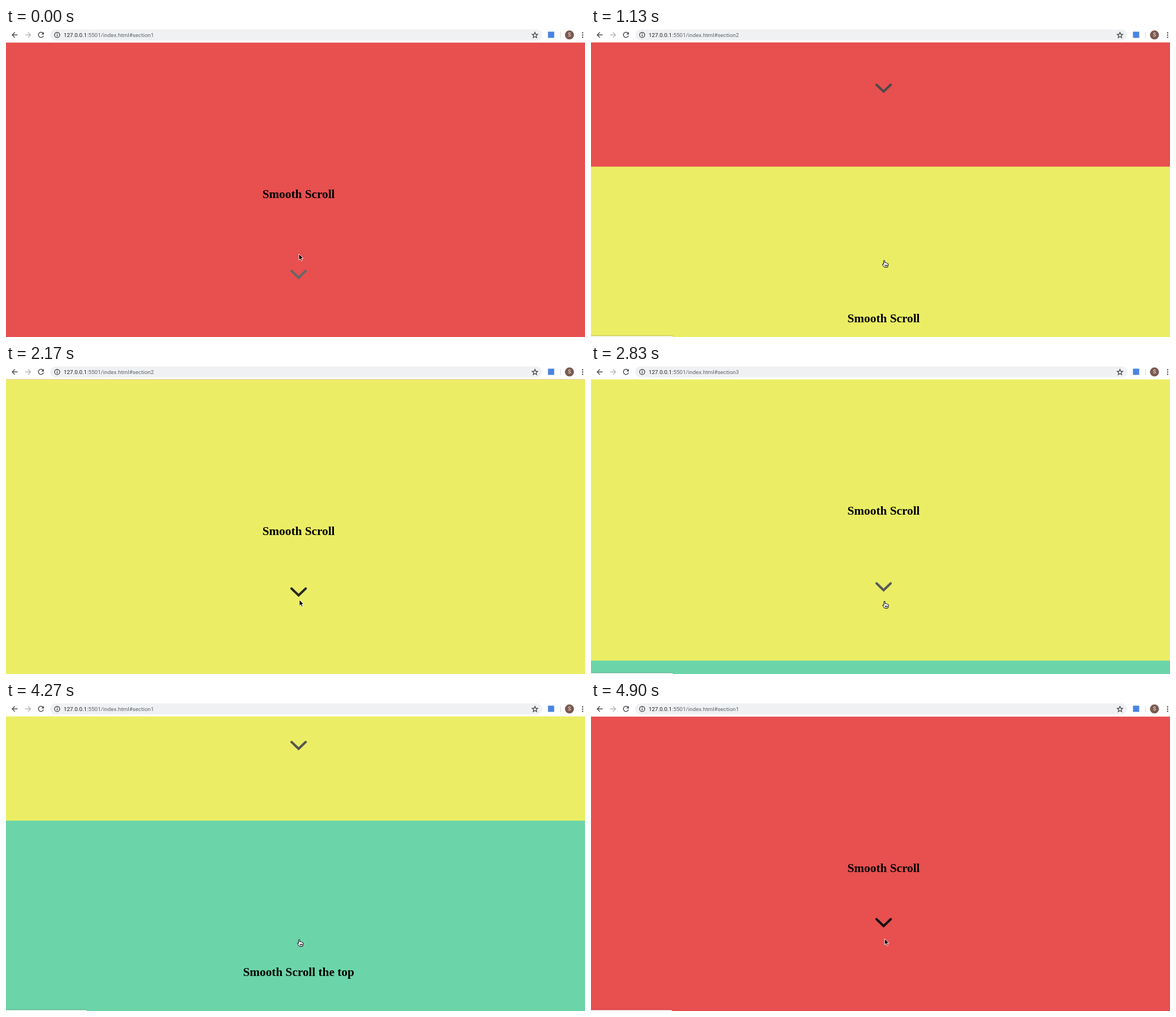
An HTML page that plays this animation: 1024 px wide and 547 px high, repeating every 4930 ms.

```html
<!DOCTYPE html>
<html lang="en">
<head>
<meta charset="utf-8">
<title>Smooth Scroll</title>
<style>
  html, body { margin: 0; width: 100%; height: 100%; overflow: hidden; background: #fff; }
  svg { display: block; width: 1024px; height: 547px; }
  .heading { font: bold 21.3px "Liberation Serif", Times, serif; text-anchor: middle; }
  .url { font: 9.9px Roboto, Arial, sans-serif; fill: #5f6368; }
  .url .host { fill: #202124; }
  .icon { fill: none; stroke: #4a4d51; stroke-width: 1.4; }
  .chevron { fill: none; stroke-width: 4.2; stroke-linecap: round; }
</style>
</head>
<body>
<svg viewBox="0 0 1024 547">
  <defs>
    <filter id="shadow" x="-10%" y="-300%" width="120%" height="700%">
      <feDropShadow dx="0" dy="0" stdDeviation="0.9" flood-opacity=".6"/>
    </filter>
  </defs>

  <g id="page"></g>

  <rect id="status" x="-6" y="545.5" width="152" height="8" rx="2.5" fill="#fff" filter="url(#shadow)"/>

  <g id="toolbar">
    <rect width="1024" height="25.5" fill="#fff"/>
    <rect x="78" y="2.5" width="870" height="19.5" rx="9.75" fill="#eff1f3"/>
    <path class="icon" d="M20.500 12.300H11M15.600 7.600L11 12.300L15.600 17"/>
    <path class="icon" style="stroke:#b4b6b9" d="M34 12.300H43.500M38.900 7.600L43.500 12.300L38.900 17"/>
    <path class="icon" d="M65.600 9.300A4.600 4.600 0 1 0 66.300 13.600"/>
    <path fill="#4a4d51" d="M67 7V11.500H62.500Z"/>
    <circle class="icon" cx="90.500" cy="12.300" r="4.600" stroke-width="1.100"/>
    <path class="icon" stroke-width="1.200" d="M90.500 11.500V15M90.500 9.300V10.500"/>
    <text class="url" x="102" y="16"><tspan class="host">127.0.0.1</tspan>:5501/index.html#section<tspan id="anchor">1</tspan></text>
    <path class="icon" stroke-width="1.100" d="M935.500 7.800L936.900 11L940.300 11.300L937.700 13.600L938.500 17L935.500 15.200L932.500 17L933.300 13.600L930.700 11.300L934.100 11Z"/>
    <rect x="958.500" y="6.500" width="11" height="11" fill="#4a83e2"/>
    <path d="M980.500 7V18" stroke="#d5d7da"/>
    <circle cx="996.500" cy="12.300" r="8" fill="#7b5a50"/>
    <text x="996.500" y="15.300" fill="#fff" text-anchor="middle" font-family="Roboto, sans-serif" font-size="8.500">S</text>
    <g fill="#4a4d51">
      <circle cx="1019.800" cy="8.500" r="1.200"/><circle cx="1019.800" cy="12.500" r="1.200"/><circle cx="1019.800" cy="16.500" r="1.200"/>
    </g>
  </g>

  <g id="cursor" stroke-linejoin="round">
    <path id="arrow" fill="#000" stroke="#fff" stroke-width=".9" d="M0 0V10.800L2.500 8.500L4.200 12.400L6 11.600L4.400 7.800H7.800Z"/>
    <path id="hand" fill="#fff" stroke="#000" stroke-width="1"
      d="M-1 .8Q0 -.6 1 .8V4.600Q2.300 3.600 3.200 5Q4.400 4.200 5.200 5.600Q6.900 5.200 7.200 6.800V9L6 12.600H.3L-3 8.200Q-3.600 6.600 -2.200 6.600L-1 7.600ZM1.500 8V10.800M3.300 8V10.800M5 8V10.800"/>
  </g>
</svg>
<script>
const LOOP = 4930, TOP = 25.7, SECTION = 534, CENTER = 517.5;
const BOUNCE = { period: 1500, offset: 1330, low: 381, travel: 62, gray: 116 };

const sections = [
  { color: '#e84f4f', title: 'Smooth Scroll', dir: 1 },
  { color: '#ebee64', title: 'Smooth Scroll', dir: 1 },
  { color: '#6bd5a9', title: 'Smooth Scroll the top', dir: -1 }
];
// Each click: start, duration, section left, section reached
const jumps = [[875, 464, 0, 1], [2746, 464, 1, 2], [4082, 656, 2, 0]];
// Pointer hot spot: time, x, y
const pointer = [[0, 518, 400], [350, 518, 400], [760, 518.5, 411], [1900, 518.5, 411],
  [2350, 519, 418], [3400, 519, 418], [3700, 518.5, 420], [4680, 518.5, 420], [4850, 519.3, 419]];

const $ = id => document.getElementById(id);
const within = (t, ...spans) => spans.some(([a, b]) => t >= a && t < b);
const show = (id, on) => $(id).setAttribute('visibility', on ? 'visible' : 'hidden');
const move = (node, x, y) => node.setAttribute('transform', `translate(${x} ${y})`);

$('page').innerHTML = sections.map(({ color, title, dir }, i) => `
  <g transform="translate(0 ${i * SECTION})">
    <rect width="1024" height="${SECTION + 1}" fill="${color}"/>
    <text class="heading" x="${CENTER}" y="275.3">${title}</text>
    <path class="chevron" d="M-12.500 ${-6 * dir}L0 ${6 * dir}L12.500 ${-6 * dir}"/>
  </g>`).join('');
const chevrons = [...document.querySelectorAll('.chevron')];

// cubic-bezier(.42, 0, .58, 1)
function easeInOut(x) {
  let lo = 0, hi = 1, u = .5;
  for (let i = 0; i < 24; i++) {
    u = (lo + hi) / 2;
    const bx = 3 * (1 - u) ** 2 * u * .42 + 3 * (1 - u) * u * u * .58 + u ** 3;
    if (bx < x) lo = u; else hi = u;
  }
  return u * u * (3 - 2 * u);
}

function scrollAt(t) {
  let pos = 0;
  for (const [start, duration, from, to] of jumps)
    if (t >= start) pos = from + (to - from) * easeInOut(Math.min(1, (t - start) / duration));
  return pos * SECTION;
}

function pointerAt(t) {
  const next = pointer.findIndex(p => p[0] > t);
  if (next < 0) return pointer[pointer.length - 1].slice(1);
  const [a, b] = [pointer[next - 1], pointer[next]];
  const k = easeInOut((t - a[0]) / (b[0] - a[0]));
  return [a[1] + (b[1] - a[1]) * k, a[2] + (b[2] - a[2]) * k];
}

function draw(t) {
  move($('page'), 0, TOP - scrollAt(t));

  const phase = (t + BOUNCE.offset) % BOUNCE.period / BOUNCE.period;
  const gray = Math.round(phase * BOUNCE.gray);
  chevrons.forEach((node, i) => {
    const k = sections[i].dir > 0 ? phase : 1 - phase;
    move(node, CENTER, BOUNCE.low + BOUNCE.travel * k - TOP);
    node.setAttribute('stroke', `rgb(${gray},${gray},${gray})`);
  });

  const jump = jumps.filter(j => t >= j[0]).pop();
  $('anchor').textContent = jump ? jump[3] + 1 : 1;

  const hovering = within(t, [790, 1680], [2340, 4670]);
  show('hand', hovering);
  show('arrow', !hovering);
  move($('cursor'), ...pointerAt(t));

  show('status', within(t, [810, 1900], [2400, LOOP]));
  $('status').setAttribute('width', t < 3400 ? 152 : 150);
}

function tick() {
  draw(performance.now() % LOOP);
  requestAnimationFrame(tick);
}
tick();
</script>
</body>
</html>
```
